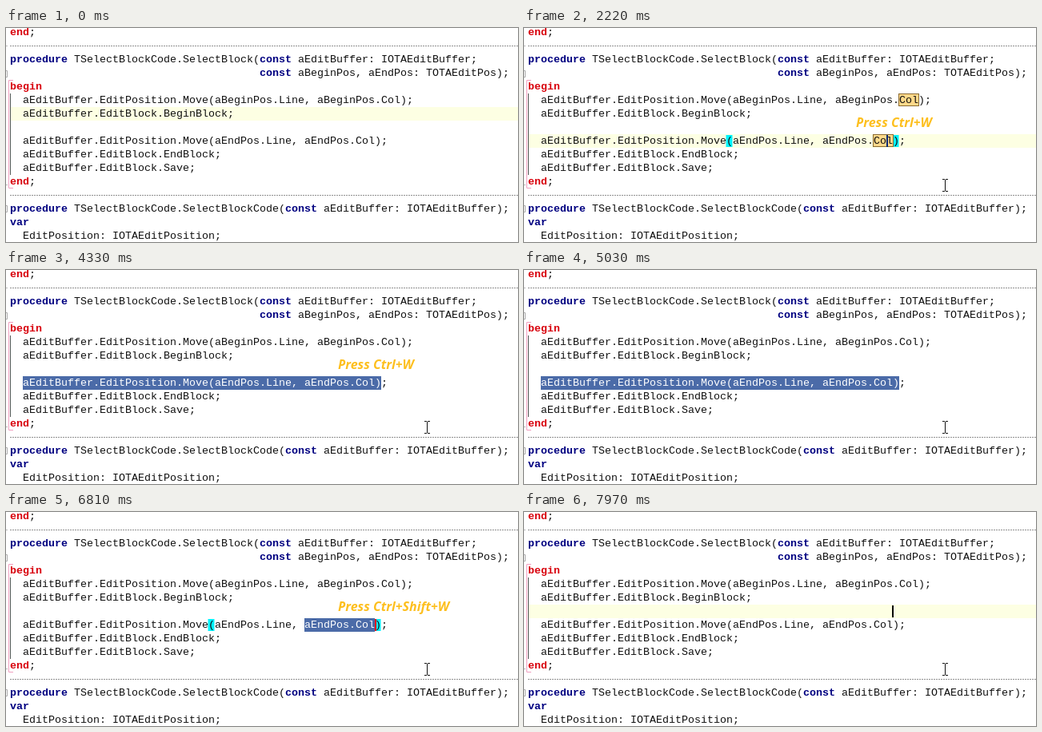
Write an HTML page that moves like this. It is 640 by 268 pixels and loops after 8 s.

```html
<!DOCTYPE html>
<html lang="en">
<head>
<meta charset="utf-8">
<title>Expanding selection</title>
<style>
  html, body { margin: 0; width: 100%; height: 100%; overflow: hidden; background: #fff; }
  svg { display: block; width: 640px; height: 268px; }
  .code { font: 13.333px "Liberation Mono", monospace; fill: #111; white-space: pre; }
  .key { font-weight: bold; fill: #000080; }
  .block { font-weight: bold; fill: #d8000c; }
  .picked { fill: #fff; }
  .label { font: italic bold 16px "Open Sans", sans-serif; fill: #fdbf1e; }
</style>
</head>
<body>
<svg id="stage" viewBox="0 0 640 268"></svg>
<script>
const LOOP = 8000, LEFT = 5, CHAR = 8, LINE = 17, TOP = -3;
const ROW = 8; // the line being selected
const lines = [
  'end;',
  '',
  'procedure TSelectBlockCode.SelectBlock(const aEditBuffer: IOTAEditBuffer;',
  ' '.repeat(39) + 'const aBeginPos, aEndPos: TOTAEditPos);',
  'begin',
  '  aEditBuffer.EditPosition.Move(aBeginPos.Line, aBeginPos.Col);',
  '  aEditBuffer.EditBlock.BeginBlock;',
  '',
  '  aEditBuffer.EditPosition.Move(aEndPos.Line, aEndPos.Col);',
  '  aEditBuffer.EditBlock.EndBlock;',
  '  aEditBuffer.EditBlock.Save;',
  'end;',
  '',
  'procedure TSelectBlockCode.SelectBlockCode(const aEditBuffer: IOTAEditBuffer);',
  'var',
  '  EditPosition: IOTAEditPosition;'
];

const colX = col => LEFT + col * CHAR;
const rowY = row => TOP + 17 + (row - 1) * LINE;
const rect = (x, y, w, h, fill, extra = '') =>
  `<rect x="${x}" y="${y}" width="${w}" height="${h}" fill="${fill}" ${extra}/>`;
const path = (d, stroke, extra = '') =>
  `<path d="${d}" fill="none" stroke="${stroke}" ${extra}/>`;
const text = (col, row, body, cls = '') =>
  `<text class="code ${cls}" x="${colX(col)}" y="${rowY(row) + 12}">${body}</text>`;

const paint = s => s
  .replace(/\b(procedure|const|var|begin|end)\b/g, w =>
    `<tspan class="${/begin|end/.test(w) ? 'block' : 'key'}">${w}</tspan>`);

const codeLayer = lines.map((s, row) => {
  const body = s.trimStart();
  return body ? text(s.length - body.length, row, paint(body)) : '';
}).join('');

const gutter =
  [22.5, 209.5].map(y => path(`M5 ${y}H640`, '#8f8f8f', 'stroke-dasharray="2 1"')).join('') +
  [53.5, 222.5].map(y => path(`M0 ${y}h1.5v8H0`, '#aaa')).join('') +
  path('M0 22.5h2M0 196.5h2', '#bbb') +
  path('M9 65.5H3.5V200.5H9', '#f0a0c0');

// Each state: [start, current row, selected columns, caret, word marks, bracket marks]
const caretOn = { row: ROW, marks: 2, brackets: true, caret: [453, ROW, '#082b78'] };
const pick = (from, to, more) => ({ sel: [from, to], ...more });
const inside = { brackets: true, caret: [461, ROW, '#e00000'] };
const word = pick(54, 57, inside);
const member = pick(46, 57, inside);
const args = pick(32, 57, inside);
const call = pick(31, 58);
const states = [
  [0, { row: 6 }],
  [1450, caretOn],
  [2300, word],
  [2760, { ...member, marks: 1 }],
  [2840, member],
  [3320, args],
  [3850, call],
  [4330, pick(2, 58)],
  [5260, call],
  [6190, args],
  [6660, { ...member, marks: 1 }],
  [6730, member],
  [7190, word],
  [7900, caretOn],
  [7970, { row: 7, caret: [460, 7, '#000'] }]
];

const labels = [
  [0, ''], [1450, 'Press Ctrl+W'], [5030, ''], [5180, 'Press Ctrl+Shift+W'], [7730, '']
];

const pointer = [
  [0, null], [360, [506, 265]], [440, [495, 248]], [510, [480, 226]], [590, [467, 209]],
  [820, [466, 204]], [900, [463, 191]], [980, [460, 175]], [1050, [457, 162]],
  [1130, [455, 153]], [1200, [454, 150]], [1750, [492, 175]], [1830, [526, 197]]
];

// Fold line is briefly unpainted beside the changed row
const gaps = [[2760, 2920], [3320, 3390], [6660, 6810], [7190, 7270]];

const at = (track, t) => track.findLast(([start]) => start <= t)[1];

function back({ row, marks = 0, brackets, sel }) {
  let out = row ? rect(6, rowY(row), 634, LINE, '#fdffe3') : '';
  if (brackets) {
    for (const col of [31, 57]) out += rect(colX(col) - 0.5, rowY(ROW) + 1, 8, 15, '#00f4ff');
  }
  const spots = [[58, 5], [54, ROW]].slice(0, marks);
  for (const [col, r] of spots) {
    out += rect(colX(col) - 0.5, rowY(r) + 0.5, 25, 15, '#ffd98a', 'stroke="#8a6a30"');
  }
  if (sel) out += rect(colX(sel[0]), rowY(ROW), (sel[1] - sel[0]) * CHAR, LINE, '#4b6ba8');
  return out;
}

function front({ sel, caret }) {
  let out = '';
  if (sel) {
    const [a, b] = sel;
    // Cover the dark glyphs before writing the light ones
    out += rect(colX(a), rowY(ROW), (b - a) * CHAR, LINE, '#4b6ba8') +
      text(a, ROW, lines[ROW].slice(a, b), 'picked');
  }
  if (caret) out += rect(caret[0], rowY(caret[1]) + 1, 2, 15, caret[2]);
  return out;
}

function beam([x, y]) {
  return `<g transform="translate(${x} ${y})">` +
    path('M-3 -7.5H0M1 -7.5H4M.5 -7V7M-3 7.5H0M1 7.5H4', '#111') + '</g>';
}

function foldLine(t) {
  const gap = gaps.some(([a, b]) => t >= a && t < b);
  return path(gap ? 'M5.5 82V133M5.5 150V184' : 'M5.5 82V184', '#555');
}

const stage = document.getElementById('stage');
let shown = '';

function draw(t) {
  const state = at(states, t), spot = at(pointer, t), label = at(labels, t);
  const html = rect(0, 0, 640, 268, '#fff') + back(state) + gutter + foldLine(t) +
    codeLayer + front(state) +
    (label && `<text class="label" x="415" y="124">${label}</text>`) +
    (spot ? beam(spot) : '');
  if (html !== shown) stage.innerHTML = shown = html;
}

function tick() {
  draw(performance.now() % LOOP);
  requestAnimationFrame(tick);
}
tick();
</script>
</body>
</html>
```
